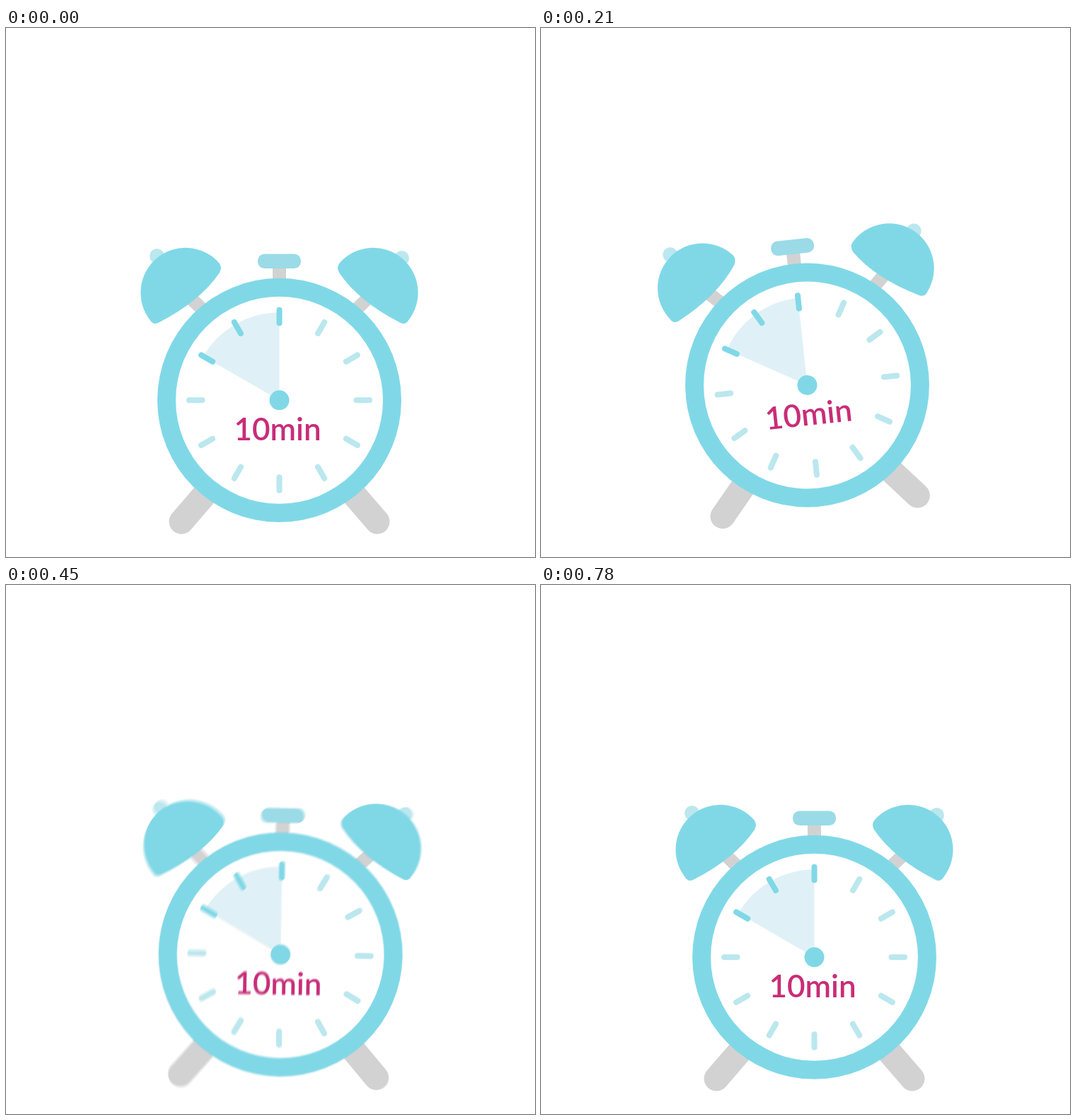
Write an HTML page with a canvas that moves like this. It is 748 by 748 pixels and loops after 1.17 s.

```html
<!DOCTYPE html>
<html lang="en">
<head>
<meta charset="utf-8">
<title>Alarm clock</title>
<style>
html, body { margin: 0; width: 100%; height: 100%; overflow: hidden; background: #fff; }
canvas { display: block; width: 748px; height: 748px; }
</style>
</head>
<body>
<canvas id="stage" width="748" height="748"></canvas>
<script>
const SIZE = 748, LOOP = 1170, STEP = 30;
const CX = 386.5, CY = 526.3;
const BLUE = '#80d8e7', PALE = '#bbe7ee', BUTTON = '#9adbe7',
      WEDGE = '#dff1f6', GREY = '#d2d2d2', PINK = '#c82d78';
const SHUTTER = 12, SAMPLES = 8;

const out = document.getElementById('stage').getContext('2d');
const layer = document.createElement('canvas');
layer.width = layer.height = SIZE;
const g = layer.getContext('2d');

const bell = new Path2D('M204 413.5 A63.4 63.4 0 0 1 301.5 332.5 Q306 338 302 346 Q274 387 215 417 Q208 420 204 413.5Z');

// [time, tilt in degrees]
const KEYS = [[30, 0], [210, -6.1], [360, 6], [540, -4]];
const END = 780;

function tilt(t) {
  if (t <= KEYS[0][0] || t >= END) return 0;
  for (let i = 1; i < KEYS.length; i++) {
    const [t0, a] = KEYS[i - 1], [t1, b] = KEYS[i];
    if (t < t1) {
      const u = (t - t0) / (t1 - t0);
      return a + (b - a) * u * u * (3 - 2 * u);
    }
  }
  const [t0, a] = KEYS[KEYS.length - 1];
  return a * (1 - (t - t0) / (END - t0)) ** 2.5;
}

function disc(x, y, r, color) {
  g.fillStyle = color;
  g.beginPath();
  g.arc(x, y, r, 0, 2 * Math.PI);
  g.fill();
}

function line(x0, y0, x1, y1, width, color, cap = 'round') {
  g.strokeStyle = color;
  g.lineWidth = width;
  g.lineCap = cap;
  g.beginPath();
  g.moveTo(x0, y0);
  g.lineTo(x1, y1);
  g.stroke();
}

// One bell with its post and leg, drawn on the left
function side(knobY) {
  line(248, 698, 292, 647, 35, GREY);
  line(257, 378, 284, 404, 18.5, GREY, 'butt');
  disc(213.5, knobY, 10.5, PALE);
  g.fillStyle = BLUE;
  g.fill(bell);
}

function drawClock(angle) {
  g.setTransform(1, 0, 0, 1, 0, 0);
  g.fillStyle = '#fff';
  g.fillRect(0, 0, SIZE, SIZE);

  // Rocking: leans sideways and lifts with the tilt
  g.translate(CX + 1.65 * angle, CY - (angle < 0 ? 3.5 : 3.85) * Math.abs(angle));
  g.rotate(angle * Math.PI / 180);
  g.translate(-CX, -CY);

  side(322.5);
  g.save();
  g.translate(2 * CX, 0);
  g.scale(-1, 1);
  side(325.5);
  g.restore();

  line(CX, 336, CX, 360, 19, GREY, 'butt');
  g.fillStyle = BUTTON;
  g.beginPath();
  g.roundRect(356, 319.5, 61, 20.5, 9.5);
  g.fill();

  disc(CX, CY, 172.5, BLUE);
  disc(CX, CY, 146.5, '#fff');

  g.fillStyle = WEDGE;
  g.beginPath();
  g.moveTo(CX, CY);
  g.arc(CX, CY, 124, -Math.PI * 5 / 6, -Math.PI / 2);
  g.fill();

  for (let h = 0; h < 12; h++) {
    const a = h * Math.PI / 6, s = Math.sin(a), c = -Math.cos(a);
    const color = h === 0 || h > 9 ? BLUE : PALE;
    line(CX + 109 * s, CY + 109 * c, CX + 127.5 * s, CY + 127.5 * c, 8, color);
  }
  disc(CX, CY, 14, BLUE);

  g.fillStyle = PINK;
  g.font = '600 44px Lato, sans-serif';
  g.textAlign = 'center';
  g.fillText('10min', 384, 583);
}

function frame(now) {
  const t = Math.floor(now % LOOP / STEP) * STEP;
  // Average a few poses for motion blur
  for (let i = 0; i < SAMPLES; i++) {
    drawClock(tilt(t + SHUTTER * ((i + 0.5) / SAMPLES - 0.5)));
    out.globalAlpha = 1 / (i + 1);
    out.drawImage(layer, 0, 0);
  }
  requestAnimationFrame(start);
}

let origin;
function start(now) {
  origin ??= now;
  frame(now - origin);
}
requestAnimationFrame(start);
</script>
</body>
</html>
```
